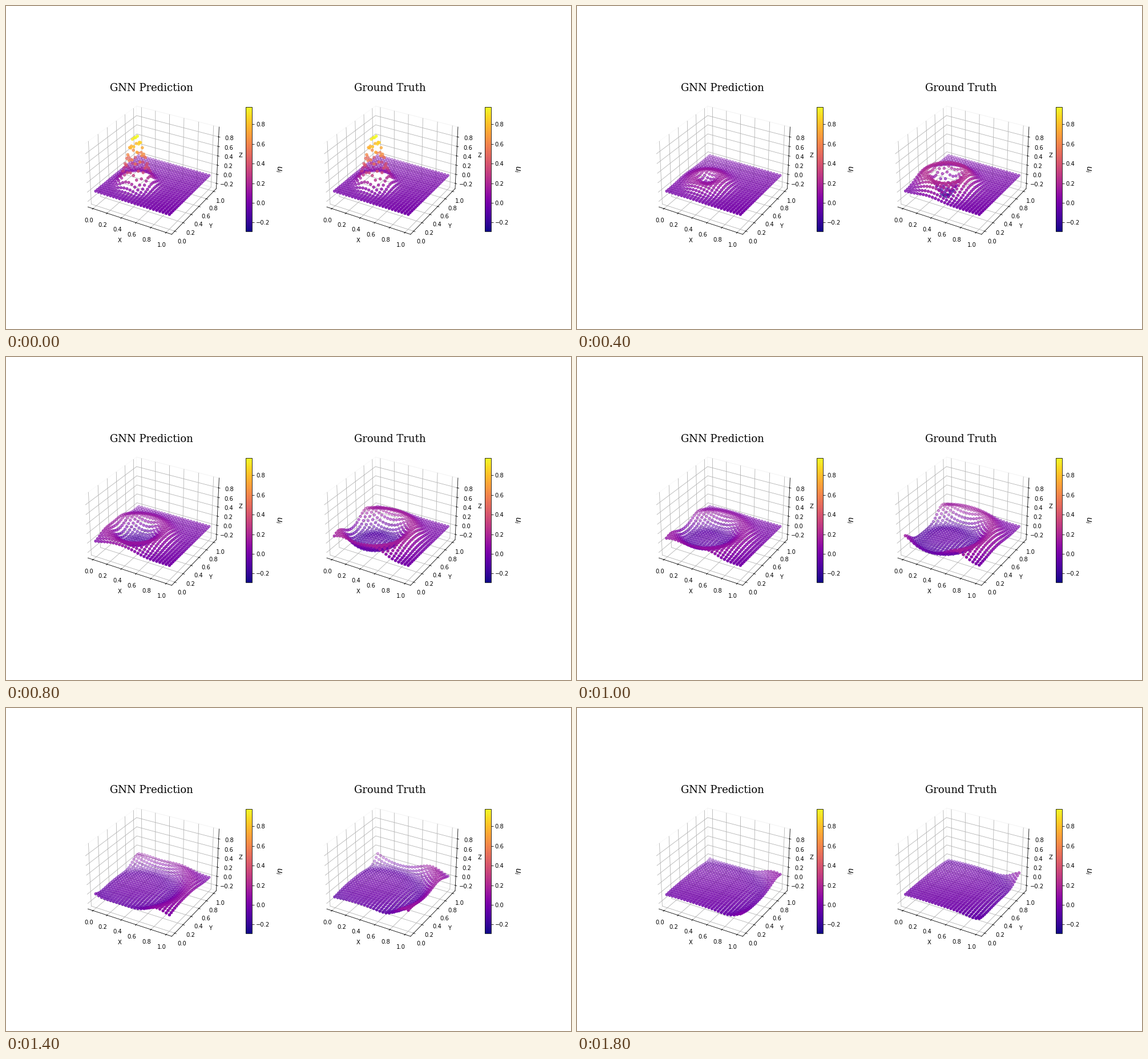
These frames come from a looping animation (990 px wide and 566 px high, 2 s). A matplotlib script:

```python
import numpy as np
import matplotlib.pyplot as plt
from matplotlib.animation import FuncAnimation

DPI = 72
STEPS = 10
GRID = 25
CENTER = (0.325, 0.396)
SIGMA = 0.1
LOW, HIGH = -0.29, 0.978

# Travelled distance and strength of the wave at each step.
TRUE_DIST = 0.1 * np.arange(STEPS)
TRUE_AMP = np.ones(STEPS)
PRED_DIST = np.array([0, 0.05, 0.13, 0.21, 0.3, 0.4, 0.5, 0.6, 0.7, 0.8])
PRED_AMP = np.array([1, 1, 0.5, 0.6] + [0.65] * 6)

plt.rcParams["font.family"] = "DejaVu Sans"

axis = np.linspace(0, 1, GRID)
gx, gy = (g.ravel() for g in np.meshgrid(axis, axis))
dist = np.hypot(gx - CENTER[0], gy - CENTER[1])

# Hankel transform pieces for a Gaussian pulse spreading in free space.
radii = np.linspace(0, 1, 161)
dk = 0.25
k = dk * (np.arange(240) + 0.5)
theta = np.pi * (np.arange(64) + 0.5) / 64
bessel = np.cos(np.outer(radii, k)[..., None] * np.sin(theta)).mean(axis=2)
weight = SIGMA**2 * k * np.exp(-(k * SIGMA) ** 2 / 2) * dk


def wave(travel):
    """Height of the wave at every grid node."""
    return np.interp(dist, radii, bessel @ (weight * np.cos(k * travel)))


def pad(low, high, part=1 / 48):
    extra = (high - low) * part
    return low - extra, high + extra


def make_panel(slot, title):
    ax = fig.add_subplot(1, 2, slot, projection="3d")
    ax.set_title(title, fontsize=18, family="DejaVu Serif")
    ax.set_xlim(*pad(-0.05, 1.05))
    ax.set_ylim(*pad(-0.05, 1.05))
    ax.set_zlim(*pad(LOW, HIGH))
    ax.set_xticks(np.linspace(0, 1, 6))
    ax.set_yticks(np.linspace(0, 1, 6))
    ax.set_zticks(np.linspace(-0.2, 0.8, 6))
    ax.set_xlabel("X")
    ax.set_ylabel("Y")
    ax.set_zlabel("Z")
    for side in (ax.xaxis, ax.yaxis, ax.zaxis):
        side.pane.fill = False
    mapper = plt.cm.ScalarMappable(plt.Normalize(LOW, HIGH), "plasma")
    bar = fig.colorbar(mapper, ax=ax, shrink=0.5, pad=0.1)
    bar.set_label("$u_i$", rotation=270, labelpad=22, fontsize=14)
    return ax


fig = plt.figure(figsize=(990 / DPI, 566 / DPI), dpi=DPI)
panels = [
    (make_panel(1, "GNN Prediction"), PRED_DIST, PRED_AMP),
    (make_panel(2, "Ground Truth"), TRUE_DIST, TRUE_AMP),
]
clouds = []


def draw(step):
    while clouds:
        clouds.pop().remove()
    for ax, travel, amp in panels:
        z = amp[step] * wave(travel[step])
        clouds.append(
            ax.scatter(gx, gy, z, c=z, s=20, cmap="plasma", vmin=LOW, vmax=HIGH)
        )
    return clouds


anim = FuncAnimation(
    fig, draw, frames=STEPS, init_func=lambda: draw(0), interval=200, repeat=True
)
plt.show()
```
